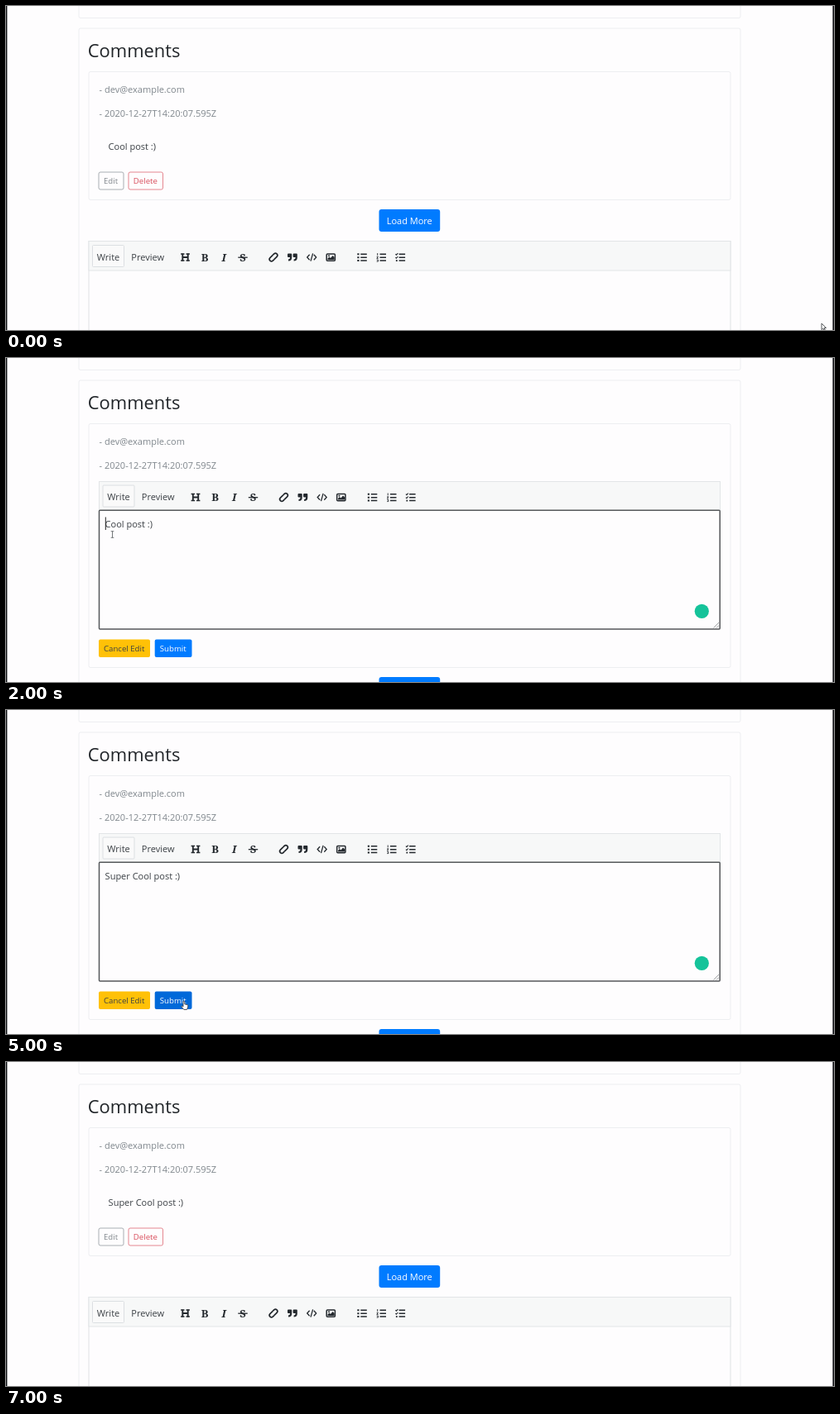
These frames come from a looping animation (1000 px wide and 392 px high, 7.1 s). An HTML page:

```html
<!DOCTYPE html>
<html lang="en">
<head>
<meta charset="utf-8">
<title>Edit a comment</title>
<style>
  html, body { margin: 0; height: 100%; overflow: hidden; background: #fefdfe; }
  svg { display: block; width: 100vw; height: 100vh; }
  text { font: 11px "Open Sans", "Noto Sans", sans-serif; fill: #3a3f44; white-space: pre; }
  .title { font-size: 21.9px; font-weight: 500; fill: #212529; }
  .muted { fill: #7f868c; }
  .small { font-size: 9.65px; }
  .light { fill: #fff; }
  .card { fill: none; stroke: #edeef1; }
  .head { fill: #f7f8f8; stroke: #e2e5e7; }
  .area { fill: #fefdfe; stroke: #dfe2e4; }
  .focus .area { stroke: #55585b; stroke-width: 1.5; }
  .blue { fill: #007bff; }
  .blue.hover { fill: #0069d9; }
  .outline rect { fill: #fefdfe; stroke: #a9aeb3; }
  .outline text { fill: #80868c; }
  .outline.hover rect { fill: #6c757d; stroke: #6c757d; }
  .red rect { stroke: #e58690; }
  .red text { fill: #d84c5a; }
  .red.hover rect { fill: #dc3545; stroke: #dc3545; }
  .outline.hover text { fill: #fff; }
  .icons { fill: none; stroke: #24292e; stroke-width: 1.5; }
  .icons text { font: bold 13px "Noto Serif", "Liberation Serif", serif; text-anchor: middle; stroke: none; fill: #24292e; }
  .solid { fill: #24292e; stroke: none; }
  .pointer { fill: #fff; stroke: #44474a; stroke-width: .9; stroke-linejoin: round; }
</style>
</head>
<body>
<svg viewBox="0 0 1000 392" preserveAspectRatio="none">
  <defs>
    <g id="bar">
      <rect x="104.5" y="289.5" width="38" height="26" rx="1" fill="#fafafa" stroke="#dcdfe2"/>
      <text x="109.8" y="307.5">Write</text>
      <text x="151.3" y="307.5">Preview</text>
      <g class="icons">
        <g transform="translate(216.5 304)">
          <path d="M-3.2-4.5v9M3.2-4.5v9M-3 0h6" stroke-width="1.9"/>
          <path d="M-5.4-4h4.4M1-4h4.4M-5.4 4h4.4M1 4h4.4" stroke-width="1.4"/>
        </g>
        <text x="240" y="308.7">B</text>
        <text x="263" y="308.7" font-style="italic" style="font-style:italic">I</text>
        <text x="286" y="308.7">S</text>
        <path d="M280.3 304.2h11.4" stroke-width="1.3"/>
        <g transform="translate(323 304) rotate(-45)" stroke-width="1.7">
          <path d="M1.3-2.4H-3.4a2.4 2.4 0 0 0 0 4.8h2.2"/>
          <path d="M-1.3 2.4H3.4a2.4 2.4 0 0 0 0-4.8H1.2"/>
        </g>
        <g transform="translate(346 304)" class="solid">
          <path id="mark" d="M-5-4.6h3.2q1 0 1 1v4q0 4-4.2 4.2v-2q2-.2 2-2.2v-.3h-2q-1 0-1-1v-2.700q0-1 1-1z"/>
          <use href="#mark" x="6.6"/>
        </g>
        <path d="M366.600 300.800l-2.900 3.200 2.900 3.200M371.800 300.800l2.900 3.200-2.900 3.200M370.600 299.400l-2.600 9.200" stroke-width="1.300"/>
        <rect x="387.200" y="299.900" width="10.200" height="8.400" rx="1"/>
        <path class="solid" d="M388.500 307v-1.600l1.900-1.900 1.500 1.400 2.700-2.900 2 2v3z"/>
        <circle class="solid" cx="390" cy="302.300" r="1"/>
        <path id="rows" d="M428.300 300.300h7.500M428.300 304.200h7.500M428.300 308.100h7.500"/>
        <use href="#rows" x="23.200"/>
        <use href="#rows" x="46.300"/>
        <path d="M424.300 300.300h2.200M424.300 304.200h2.200M424.300 308.100h2.200" stroke-width="2"/>
        <path d="M448.700 299v2.800M447.700 303.300h1.700l-1.600 2.100h1.800M447.700 307.100h1.700v2h-1.700" stroke-width=".9"/>
        <path d="M470.400 300.200l1 1 1.900-2.100M470.400 304.100l1 1 1.900-2.100" stroke-width="1.100"/>
        <path d="M470.900 308.100h1.800" stroke-width="1.800"/>
      </g>
    </g>
    <g id="load">
      <rect class="blue" x="450.500" y="246" width="73.700" height="27" rx="3"/>
      <text class="light" x="459.700" y="264">Load More</text>
    </g>
  </defs>

  <path class="card" d="M88 -5V12.500q0 2 2 2H885q2 0 2-2V-5"/>
  <path class="card" d="M88 400V29q0-2 2-2H885q2 0 2 2V400"/>
  <text class="title" x="98.800" y="62">Comments</text>
  <rect class="card" id="card" x="100" y="79.500" width="775" height="155" rx="2"/>
  <text class="muted" x="112.600" y="105.300">- dev@example.com</text>
  <text class="muted" x="112.600" y="133.500">- 2020-12-27T14:20:07.595Z</text>

  <g id="view">
    <text id="post" x="123.600" y="173.500"></text>
    <g class="outline" id="edit">
      <rect x="112" y="201" width="30" height="21" rx="2"/>
      <text class="small" x="118" y="215.200">Edit</text>
    </g>
    <g class="outline red" id="del">
      <rect x="148" y="201" width="41.500" height="21" rx="2"/>
      <text class="small" x="153.800" y="215.200">Delete</text>
    </g>
    <use href="#load"/>
    <rect class="area" x="100" y="284.500" width="775" height="120"/>
    <rect class="head" x="100" y="284.500" width="775" height="35.500"/>
    <use href="#bar"/>
  </g>

  <g id="form">
    <rect class="head" x="112.500" y="149.500" width="750" height="35"/>
    <use href="#bar" x="12.500" y="-135.500"/>
    <rect class="area" x="112.500" y="184.300" width="749.700" height="143.700" rx="1"/>
    <path d="M854.500 326.500l6.500-6.500M858 326.500l3-3" stroke="#85888b" stroke-width=".8"/>
    <text id="draft" x="119.600" y="205"></text>
    <path id="caret" d="M0 192.500v15.500" stroke="#222"/>
    <circle id="badge" cx="840.300" cy="306.300" r="8.600" fill="#15c39a"/>
    <rect x="112" y="340.500" width="62" height="21.500" rx="2" fill="#ffc107"/>
    <text class="small" x="118" y="355">Cancel Edit</text>
    <rect class="blue" id="submit" x="179.700" y="340.500" width="44.800" height="21.500" rx="2"/>
    <text class="small light" x="185.800" y="355">Submit</text>
    <use href="#load" y="140"/>
  </g>

  <g id="mouse" class="pointer">
    <path id="arrow" d="M0 0v7.600l1.800-1.600 1.200 2.600 1.300-.6-1.200-2.500h2.400z"/>
    <g id="beam" fill="none"><path d="M-1.800-3.800h3.600M0-3.800v7.600M-1.800 3.800h3.600" stroke="#66696c"/></g>
    <path id="hand" d="M-1-4.500q1-1 1.800 0v3.300l3.200.8q1 .4.8 1.600l-.6 2.600-.8 1.700h-3.600l-3-3.600q.2-1.200 1.400-.6l.8.7z"/>
  </g>
  <path d="M.6 0v392M999.200 0v392" stroke="#111216" stroke-width="1.600"/>
</svg>
<script>
  const LOOP = 7100, STEP = 100, BLINK = 530;
  const OPEN = 800, FOCUS = 1600, BADGE = 1800, BLUR = 5300, SAVED = 5700;
  const WORD = "Super ", REST = "Cool post :)";
  const keys = [2500, 2800, 3000, 3400, 3700, 4000];

  // time, x, y
  const path = [
    [0, 985, 384], [500, 131, 214], [600, 127, 214], [700, 127.500, 225], [900, 127.500, 225],
    [1400, 128.500, 213.500], [4100, 128.500, 213.500], [4300, 129.500, 213.500], [4400, 129.500, 213.500],
    [4900, 215, 357], [5800, 215, 357], [6300, 180, 214], [6600, 163, 6], [6700, 161, -20], [LOOP, 161, -20]
  ];
  // start of each pointer shape
  const shapes = [[0, "arrow"], [500, "hand"], [700, "beam"], [4700, "arrow"], [4900, "hand"],
    [SAVED, "beam"], [6000, "arrow"], [6300, "hand"], [6400, "arrow"]];

  const $ = id => document.getElementById(id);
  const show = (id, on) => { $(id).style.display = on ? "" : "none"; };
  const hover = (id, on) => $(id).classList.toggle("hover", on);
  const ease = p => p * p * (3 - 2 * p);
  const latest = (list, t) => list.filter(k => k[0] <= t).pop();

  function mouseAt(t) {
    const i = path.findIndex(k => k[0] > t);
    const [t0, x0, y0] = path[i - 1], [t1, x1, y1] = path[i];
    const p = ease((t - t0) / (t1 - t0));
    return [x0 + (x1 - x0) * p, y0 + (y1 - y0) * p];
  }

  function render(t) {
    const editing = t >= OPEN && t < SAVED;
    const focused = t >= FOCUS && t < BLUR;
    const typed = keys.filter(k => k <= t);
    const n = typed.length;
    const [x, y] = mouseAt(t);
    const shape = latest(shapes, t)[1];

    show("view", !editing);
    show("form", editing);
    $("card").setAttribute("height", editing ? 295 : 155);
    $("post").textContent = (t >= SAVED ? WORD : "") + REST;
    hover("edit", t >= 500 && t < OPEN);
    hover("del", t >= SAVED && x > 148 && x < 190 && y > 200 && y < 222);

    if (editing) {
      const draft = $("draft");
      draft.textContent = WORD.slice(0, n) + REST;
      const cx = 120.300 + (n ? draft.getSubStringLength(0, n) : 0);
      $("caret").setAttribute("transform", `translate(${cx} 0)`);
      const since = t - (n ? typed[n - 1] : FOCUS);
      show("caret", focused && Math.floor(since / BLINK) % 2 === 0);
      show("badge", t >= BADGE);
      $("form").classList.toggle("focus", focused);
      hover("submit", shape === "hand");
    }

    $("mouse").setAttribute("transform", `translate(${x} ${y})`);
    for (const s of ["arrow", "beam", "hand"]) show(s, s === shape);
  }

  const start = performance.now();
  function tick() {
    const t = (performance.now() - start) % LOOP;
    render(Math.floor(t / STEP) * STEP);
    requestAnimationFrame(tick);
  }
  tick();
</script>
</body>
</html>
```
